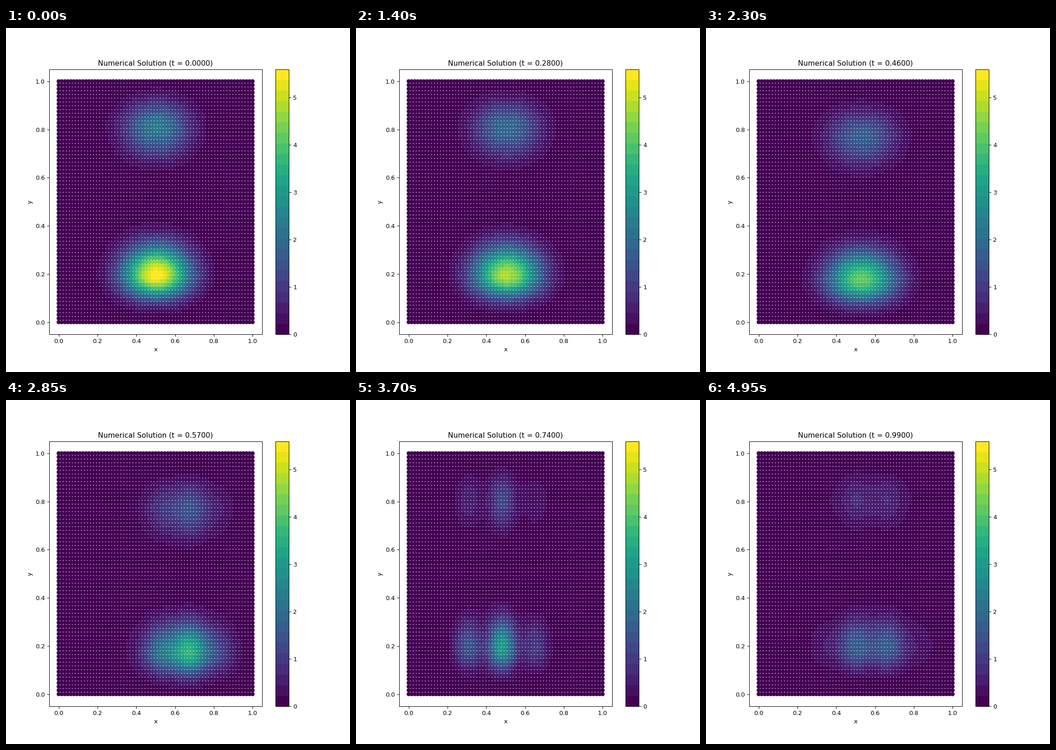
Recreate the animation shown at these times as a matplotlib script. Size 748 px wide and 748 px high, loop 5 s.

```python
import numpy as np
import matplotlib.pyplot as plt
from matplotlib.animation import FuncAnimation

INCHES, DPI = 8, 93.5  # 748 px square
FRAMES, INTERVAL = 100, 50
GRID, PEAK, LEVELS = 65, 5.6, 25
SWING_RATE = 1.919  # radians per frame
FRINGE_AT, FRINGE_GAP = 0.485, 0.2
UPPER_RATIO = 0.41


def bump(s, centre, below, above):
    """Gaussian with separate widths on either side of its centre."""
    width = np.where(s < centre, below, above)
    return np.exp(-0.5 * ((s - centre) / width) ** 2)


def across(n, t):
    """Swinging packet that decays and breaks into fringes."""
    reach = 0.06 + 0.12 * np.sin(np.pi * t)
    centre = 0.52 + reach * np.sin(SWING_RATE * n - 0.24)
    width = 0.12 + 0.03 * t ** 2
    height = PEAK - 3.6 * t ** 1.2
    depth = 0.7 * np.sin(np.pi * max(t - 0.45, 0) / 0.7) ** 2
    fringes = np.sin(np.pi * (axis - FRINGE_AT) / FRINGE_GAP) ** 2
    return height * bump(axis, centre, width, width) * (1 - depth * fringes)


def along(t):
    """Two lobes that sag briefly around the middle of the run."""
    sag = np.exp(-((t - 0.52) / 0.13) ** 2)
    lower = bump(axis, 0.195 - 0.025 * sag, 0.064, 0.086)
    upper = bump(axis, 0.81 - 0.045 * sag, 0.084, 0.074)
    return lower + UPPER_RATIO * upper


def field(n):
    t = n / FRAMES
    u = np.outer(along(t), across(n, t))
    u[[0, -1], :] = 0
    u[:, [0, -1]] = 0
    return u.ravel()


axis = np.linspace(0, 1, GRID)
gx, gy = np.meshgrid(axis, axis)

fig, ax = plt.subplots(figsize=(INCHES, INCHES), dpi=DPI)
dots = ax.scatter(gx.ravel(), gy.ravel(), c=field(0), vmin=0, vmax=PEAK,
                  cmap=plt.get_cmap("viridis", LEVELS))
fig.colorbar(dots, ax=ax)
ax.set_xlabel("x")
ax.set_ylabel("y")
title = ax.set_title("")


def update(n):
    dots.set_array(field(n))
    title.set_text(f"Numerical Solution (t = {n / FRAMES:.4f})")
    return dots, title


anim = FuncAnimation(fig, update, frames=FRAMES, interval=INTERVAL,
                     repeat=True, repeat_delay=0)
plt.show()
```
